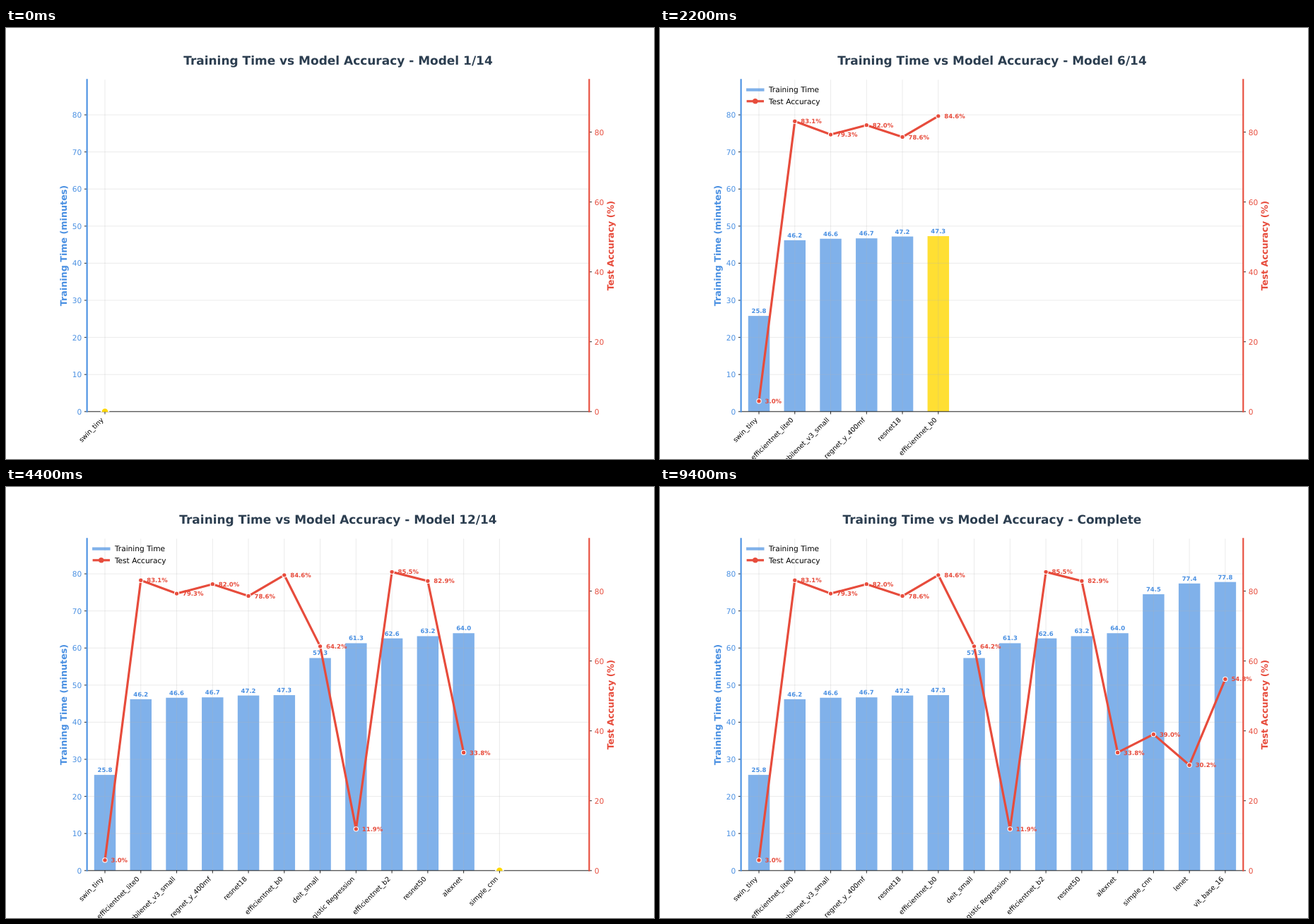
Write an HTML page that moves like this. It is 917x611 px and loops after 9.6 s.

```html
<!DOCTYPE html>
<html lang="en">
<head>
<meta charset="utf-8">
<title>Training Time vs Model Accuracy</title>
<style>
  html, body { margin: 0; width: 100%; height: 100%; overflow: hidden; background: #fff; }
  svg { display: block; }
  text { font-family: "DejaVu Sans", sans-serif; text-rendering: geometricPrecision; }
  .bold { font-weight: bold; }
</style>
</head>
<body>
<svg id="chart" width="917" height="611" viewBox="0 0 917 611"></svg>
<script>
const BLUE = '#4A90E2', RED = '#E74C3C', GOLD = '#FFD700', INK = '#2C3E50';
const STEP = 200, STEPS = 48, DONE = 26, CALM = 38;

// name, minutes, accuracy
const models = [
  ['swin_tiny', 25.8, 3.0], ['efficientnet_lite0', 46.2, 83.1],
  ['mobilenet_v3_small', 46.6, 79.3], ['regnet_y_400mf', 46.7, 82.0],
  ['resnet18', 47.2, 78.6], ['efficientnet_b0', 47.3, 84.6],
  ['deit_small', 57.3, 64.2], ['Logistic Regression', 61.3, 11.9],
  ['efficientnet_b2', 62.6, 85.5], ['resnet50', 63.2, 82.9],
  ['alexnet', 64.0, 33.8], ['simple_cnn', 74.5, 39.0],
  ['lenet', 77.4, 30.2], ['vit_base_16', 77.8, 54.8]
];
const last = models.length - 1;

const PT = 917 / 864;
const L = 114.63, R = 825.3, T = 73.3, B = 543.8;
const slot = (R - L) / models.length;
const xAt = i => L + slot * (i + 0.5);
const yTime = v => B - v * (B - T) / (77.8 * 1.15);
const yAcc = v => B - v * (B - T) / 95;

const svg = document.getElementById('chart');

function add(parent, tag, attrs, content) {
  const el = document.createElementNS('http://www.w3.org/2000/svg', tag);
  for (const key in attrs) el.setAttribute(key, attrs[key]);
  if (content !== undefined) el.textContent = content;
  parent.appendChild(el);
  return el;
}
const layer = () => add(svg, 'g', {});
const line = (g, x1, y1, x2, y2, stroke, pt, more) =>
  add(g, 'line', { x1, y1, x2, y2, stroke, 'stroke-width': pt * PT, ...more });
const label = (g, x, y, str, pt, fill, anchor, more) =>
  add(g, 'text', { x, y, fill, 'font-size': pt * PT, 'text-anchor': anchor, ...more }, str);
const bold = { class: 'bold' };
const show = (el, on) => el.setAttribute('visibility', on ? 'visible' : 'hidden');

add(svg, 'rect', { width: 917, height: 611, fill: '#fff' });
const clip = add(add(svg, 'defs', {}), 'clipPath', { id: 'plot' });
add(clip, 'rect', { x: L, y: T, width: R - L, height: B - T + 0.4 });

const bars = layer(), grid = layer(), axes = layer(), over = layer();
const faint = { 'stroke-opacity': 0.3 };

// axes
for (let v = 0; v <= 80; v += 10) {
  const y = yTime(v);
  line(grid, L, y, R, y, '#b0b0b0', 0.8, faint);
  line(axes, L - 3.5 * PT, y, L, y, '#000', 0.8);
  label(axes, L - 7 * PT, y + 4, v, 10, BLUE, 'end');
}
for (let v = 0; v <= 80; v += 20) {
  const y = yAcc(v);
  line(axes, R, y, R + 3.5 * PT, y, '#000', 0.8);
  label(axes, R + 7 * PT, y + 4, v, 10, RED, 'start');
}
line(axes, L, B, R, B, '#000', 0.8);
line(axes, L, T, L, B, BLUE, 2, { 'stroke-linecap': 'square' });
line(axes, R, T, R, B, RED, 2, { 'stroke-linecap': 'square' });

function sideTitle(x, str, fill) {
  const y = (T + B) / 2;
  label(axes, x, y, str, 12, fill, 'middle', { ...bold, transform: `rotate(-90 ${x} ${y})` });
}
sideTitle(86.5, 'Training Time (minutes)', BLUE);
sideTitle(860, 'Test Accuracy (%)', RED);
const title = label(axes, (L + R) / 2, 52.2, '', 16, INK, 'middle', bold);

// legend
const legend = add(axes, 'g', {});
const cap = { 'stroke-linecap': 'square' };
line(legend, 124.2, 87.6, 145.4, 87.6, BLUE, 4, { ...cap, 'stroke-opacity': 0.7 });
line(legend, 124.2, 103.8, 145.4, 103.8, RED, 3, cap);
add(legend, 'circle', { cx: 134.8, cy: 103.8, r: 3.7, fill: RED });
label(legend, 153.9, 91.4, 'Training Time', 10, '#000', 'start');
label(legend, 153.9, 107.6, 'Test Accuracy', 10, '#000', 'start');

// series
const curve = add(over, 'polyline', {
  fill: 'none', stroke: RED, 'stroke-width': 3 * PT, 'stroke-linejoin': 'round', 'stroke-linecap': 'square'
});
const points = models.map((m, i) => xAt(i) + ',' + yAcc(m[2]));

const parts = models.map(([name, time, acc], i) => {
  const x = xAt(i), top = yTime(time), y = yAcc(acc);
  const tick = add(grid, 'g', {});
  line(tick, x, T, x, B, '#b0b0b0', 0.8, faint);
  line(tick, x, B, x, B + 3.5 * PT, '#000', 0.8);
  const tx = x - 1.5, ty = B + 12.5;
  label(tick, tx, ty, name, 9, '#000', 'end', { transform: `rotate(-45 ${tx} ${ty})` });

  const bar = add(bars, 'rect', { x: x - slot * 0.3, y: top, width: slot * 0.6, height: B - top });
  const dot = add(over, 'circle', { cx: x, cy: y, r: 3 * PT, fill: RED, stroke: '#fff', 'stroke-width': PT });
  const notes = [
    label(axes, x, top - 4, time.toFixed(1), 8, BLUE, 'middle', bold),
    label(over, x + 8 * PT, y + 3.1, acc.toFixed(1) + '%', 8, RED, 'start', bold)
  ];
  return { tick, bar, dot, notes };
});
const seed = add(add(over, 'g', { 'clip-path': 'url(#plot)' }), 'circle',
  { cy: B, r: 5 * PT, fill: GOLD, stroke: '#fff', 'stroke-width': 2 * PT });

function render(step) {
  const now = Math.min(step >> 1, last);
  const odd = step % 2 === 1, done = step >= DONE, full = odd || done;
  parts.forEach((p, i) => {
    const past = i < now, here = i === now;
    const gold = here && step < CALM;
    show(p.tick, past || here);
    show(p.bar, past || here && full);
    show(p.dot, past || here && full);
    p.notes.forEach(n => show(n, past || here && odd));
    p.bar.setAttribute('fill', gold ? GOLD : BLUE);
    p.bar.setAttribute('fill-opacity', gold ? 0.8 : 0.7);
  });
  const count = full ? now + 1 : now;
  curve.setAttribute('points', count > 1 ? points.slice(0, count).join(' ') : '');
  seed.setAttribute('cx', xAt(now));
  show(seed, !full);
  show(legend, now > 0);
  title.textContent = 'Training Time vs Model Accuracy - ' +
    (done ? 'Complete' : `Model ${now + 1}/${models.length}`);
}

const start = performance.now();
let drawn = -1;
function tick() {
  const step = Math.floor((performance.now() - start) / STEP) % STEPS;
  if (step !== drawn) render(drawn = step);
  requestAnimationFrame(tick);
}
tick();
</script>
</body>
</html>
```
